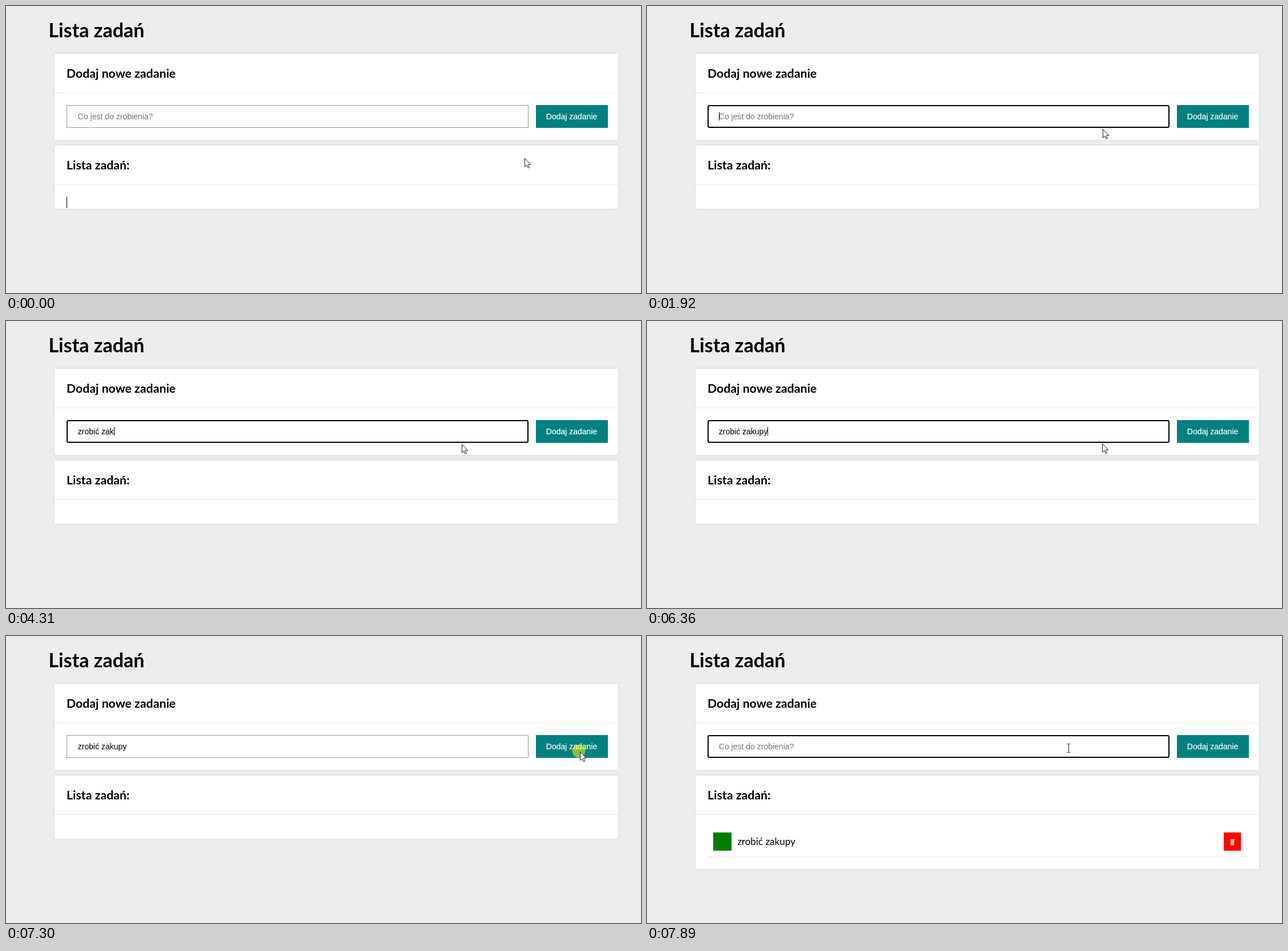
These frames come from a looping animation (1112x504 px, 8000 ms). An HTML page:

```html
<!DOCTYPE html>
<html lang="pl">
<head>
<meta charset="utf-8">
<title>Lista zadań</title>
<style>
html, body { margin: 0; height: 100%; overflow: hidden; background: #eceeed; }
svg { display: block; }
rect { shape-rendering: crispEdges; }
.lato { font-family: Lato, sans-serif; font-size: 17px; }
.h1 { font-size: 34px; font-weight: 700; }
.h2 { font-size: 21.25px; font-weight: 700; }
.ui { font: 14px "Liberation Sans", Arial, sans-serif; }
.card { fill: #fff; filter: drop-shadow(0 0 2px rgba(0, 0, 0, .1)); }
.rule { fill: #e4e5e5; }
</style>
</head>
<body>
<svg width="1112" height="504">
  <text class="lato h1" x="74.4" y="55">Lista zadań</text>

  <rect class="card" x="85" y="84" width="987" height="151"/>
  <rect class="rule" x="85" y="152" width="987" height="1"/>
  <text class="lato h2" x="106" y="126">Dodaj nowe zadanie</text>
  <rect id="thin" x="106.5" y="174.5" width="808" height="39" fill="#fff" stroke="#9a9a9a"/>
  <rect id="focus" x="107" y="175" width="807" height="38" rx="2" fill="#fff" stroke="#000" stroke-width="2" style="shape-rendering:auto"/>
  <text class="ui" id="value" x="125.8" y="199"></text>
  <rect id="caret" y="186" width="1" height="15"/>
  <rect x="928" y="174" width="126" height="40" fill="teal"/>
  <text class="ui" x="945.8" y="199" fill="#fff" stroke="#fff" stroke-width=".2">Dodaj zadanie</text>

  <rect class="card" id="list" x="85" y="245" width="987" height="111"/>
  <rect class="rule" x="85" y="313" width="987" height="1"/>
  <text class="lato h2" x="106" y="287">Lista zadań:</text>
  <rect id="listCaret" x="106" y="335" width="1" height="20"/>
  <g id="item">
    <rect x="116" y="345" width="32" height="32" fill="#007d00"/>
    <text class="lato" x="158.2" y="367">zrobić zakupy</text>
    <rect x="1010" y="345" width="30" height="32" fill="red"/>
    <path d="M1021 357h8l-1 11h-6z" fill="#b99a86"/>
    <path d="M1021 357.5h8M1023.5 359v8M1026.5 359v8" stroke="#e5ddd0"/>
    <rect class="rule" x="106" y="387" width="944" height="1"/>
  </g>

  <circle id="spot" r="11.5" fill="#ff0" fill-opacity=".5"/>
  <path id="arrow" d="M.5.5V15.5L4 12.2 6.3 17.5 8.6 16.5 6.4 11.3H10.8Z" fill="#fff" stroke="#1c1c30"/>
  <path id="beam" d="M-2.5-7.5H0M1-7.5H3.5M.5-7V7M-2.5 7.5H0M1 7.5H3.5" stroke="#222" fill="none"/>
</svg>
<script>
const $ = id => document.getElementById(id);
const LOOP = 8000, TICK = 66.33, BLINK = 530, HOLD = 140;
const FOCUS = 790, PRESS = 7220, ADD = 7350;
const PHRASE = "zrobić zakupy";
// pointer moves: start, end, x, y
const moves = [
  [320, FOCUS, 807, 201], [990, 1190, 798, 216], [6150, 6160, 797, 215],
  [6360, 6900, 1068, 225], [6900, 7160, 1005, 203], [7600, 7880, 738, 197]
];

const show = (id, on) => $(id).style.display = on ? "" : "none";
const place = (id, x, y) => $(id).setAttribute("transform", `translate(${x} ${y})`);
const blinkOn = age => Math.floor(age / BLINK) % 2 === 0;

// letters come in quick pairs, with a pause after the first five
function keyTime(i) {
  if (!i) return 2060;
  const pair = i - 1 >> 1;
  return 2340 + 400 * pair + 110 * ((i - 1) % 2) + (pair > 1 ? 340 : 0);
}
const keys = [...PHRASE].map((_, i) => keyTime(i));

function pointer(t) {
  let x = 908, y = 267;
  for (const [from, to, tx, ty] of moves) {
    const u = Math.min(1, Math.max(0, (t - from) / (to - from)));
    const k = u * u * (3 - 2 * u);
    x += (tx - x) * k;
    y += (ty - y) * k;
  }
  return [Math.round(x), Math.round(y)];
}

function draw(t) {
  const added = t >= ADD;
  const typed = added ? "" : PHRASE.slice(0, keys.filter(k => k <= t).length);
  const focused = t >= FOCUS && t < PRESS || added;
  show("thin", !focused);
  show("focus", focused);
  show("item", added);
  show("listCaret", t < FOCUS && blinkOn(t));
  $("list").setAttribute("height", added ? 164 : 111);

  const value = $("value");
  value.textContent = typed || "Co jest do zrobienia?";
  value.setAttribute("fill", typed ? "#000" : "#757575");
  const width = typed ? value.getComputedTextLength() : 0;
  $("caret").setAttribute("x", Math.floor(126 + width));
  const lastInput = [FOCUS, ...keys, ADD].filter(k => k <= t).pop();
  show("caret", focused && blinkOn(t - lastInput));

  // the pointer advances in whole ticks
  const [x, y] = pointer(Math.floor(t / TICK + .1) * TICK);
  const overInput = x > 106 && x < 915 && y > 174 && y < 214;
  show("arrow", !overInput);
  show("beam", overInput);
  place("arrow", x, y);
  place("beam", x, y);
  place("spot", x - 2, y - 1);
  show("spot", [FOCUS, PRESS].some(c => t >= c && t < c + HOLD));
}

const start = performance.now();
function frame(now) {
  draw(Math.max(0, now - start) % LOOP);
  requestAnimationFrame(frame);
}
draw(0);
requestAnimationFrame(frame);
</script>
</body>
</html>
```
